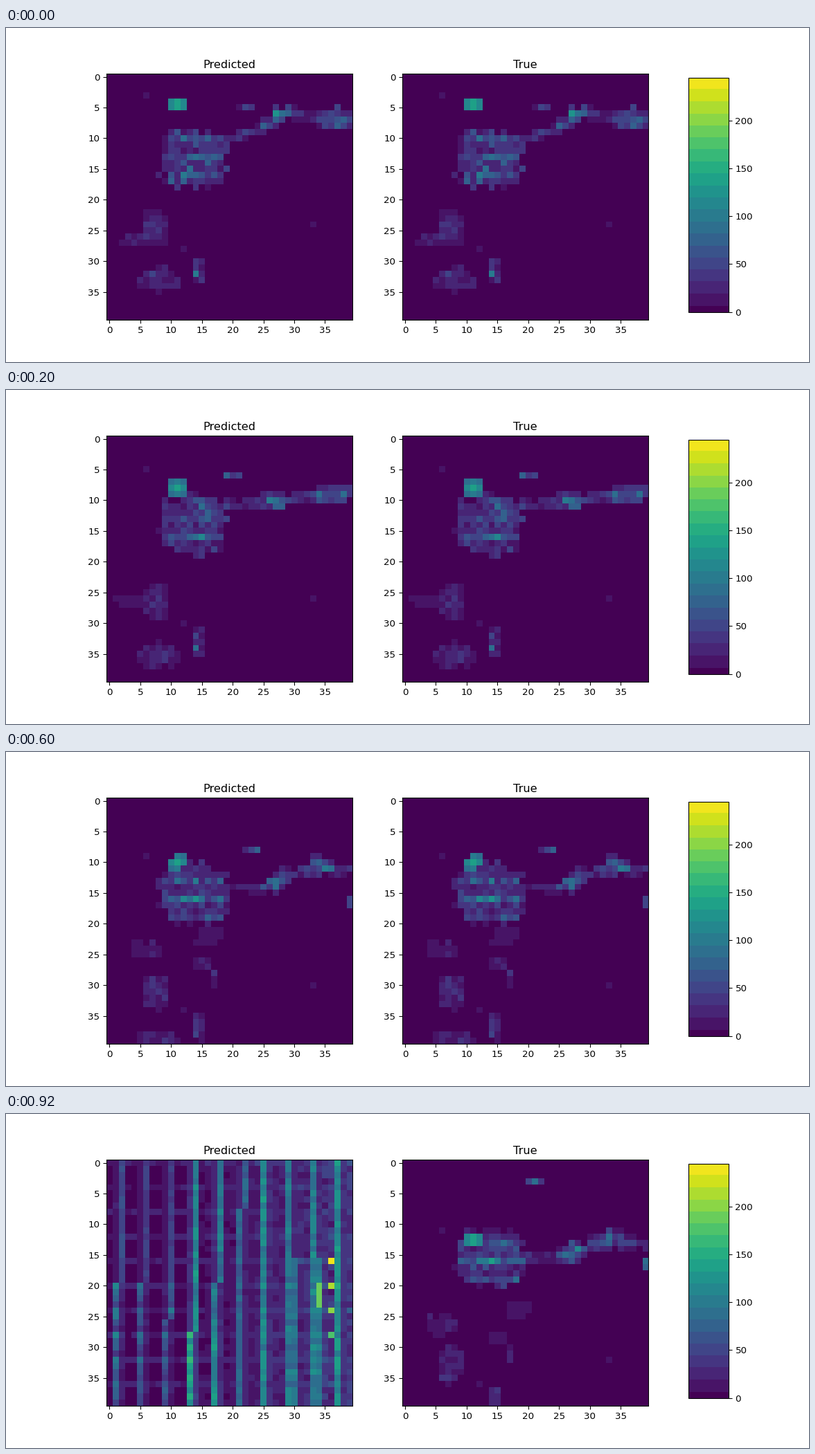
A matplotlib script that plays this animation: 1159 by 483 pixels, repeating every 1 s.

```python
import numpy as np
import matplotlib.pyplot as plt
from matplotlib.animation import FuncAnimation
from matplotlib.colors import ListedColormap

N, FRAMES = 40, 5
VMAX, STEP = 244.5, 12.6
SCALE = 0.966  # text and line size
X, Y = np.meshgrid(np.arange(N), np.arange(N))

# Key positions over time: bright head, upper fragment, and the rain band's
# row at each of its columns.
HEAD_Y = [4.6, 8, 8, 10, 12.6]
UPPER = [(22, 5), (20, 6.2), (19.4, 7.6), (23, 8), (21, 3)]
BAND_X = [19, 24, 29, 33, 39]
BAND_Y = [(10.2, 8.4, 5.8, 6.7, 7.2),
          (11, 10.2, 10, 9.5, 8.7),
          (13, 13, 11.2, 10, 9.8),
          (14, 14.3, 12.4, 10.6, 11.4),
          (15.2, 15.6, 14, 12.2, 13.3)]


def banded_viridis():
    """Viridis in flat steps, the first one half as tall."""
    v = np.linspace(0, VMAX, 490)
    level = np.minimum(np.round(v / STEP), 19) * STEP
    return ListedColormap(plt.get_cmap("viridis")(level / VMAX))


def radar(t):
    """Rain field: drifting clouds with ragged edges and grainy insides."""
    rng = np.random.default_rng(40 + t)
    grain = rng.lognormal(0, 0.35, (N, N))
    edge = rng.uniform(0.6, 1.4, (N, N))
    grid = np.zeros((N, N))

    def blob(x, y, rx, ry, value, texture=grain):
        d = np.abs((X - x) / rx) ** 3 + np.abs((Y - y) / ry) ** 3
        rain = np.where(d < edge, value * (1.15 - 0.5 * d) * texture, 0)
        np.maximum(grid, rain, out=grid)

    # Main cloud with brighter rows, its head and its hot core.
    blob(13.7, 13.3 + 0.6 * t, 5.6, 4.8, 32, grain * (1 + 0.6 * (Y % 3 == 1)))
    blob(11, HEAD_Y[t], 1.4, 1.2, 122, 1)
    blob(14, 16, 1.2, 0.6, 70 + 12 * t, 1)

    # Band to the right edge, with two brighter stretches.
    row = np.interp(X, BAND_X, BAND_Y[t])
    swell = np.exp(-((X - 27) / 2) ** 2) + np.exp(-((X - 37 + t) / 2.5) ** 2)
    width = 0.85 + 0.8 * swell
    off = np.abs(Y - row) / width
    band = (32 - 2 * t) * (1 + 1.3 * swell) * (1.2 - 0.7 * off) * grain
    np.maximum(grid, np.where((X > 18) & (off < edge), band, 0), out=grid)
    blob(*UPPER[t], 1.3, 0.6, 38)

    # Weaker clouds sinking about two rows per step.
    blob(7.5, 24.5 + 2.1 * t, 1.9, 3, 24)
    blob(8, 33 + 2.2 * t, 3.4, 2, 20)
    blob(14.5, 31.5 + 1.75 * t, 0.9, 2.4, 26)
    blob(14, 32 + 2 * t, 0.5, 0.5, 90 - 15 * t, 1)
    if t < 3:
        blob(4 - 0.7 * t, 26.4, 2.5, 1.1, 14)
    if t >= 2:
        blob(6, 17.8 + 2.15 * t, 2.8, 0.5 * t - 0.2, 14)
    if t >= 3:
        blob(9.5 + 2.2 * t, 16 + 2 * t, 2.2, 1.3, 13)
        blob(15, 20 + 2.2 * t, 1.4, 1, 14)
        blob(17, 23 + 2 * t, 0.7, 1.4, 16)
        blob(39, 16.4, 0.9, 1.2, 60)

    for x, y in [(6, 3), (12, 28), (33, 24)]:
        grid[min(y + 2 * t, N - 1), x] += 9
    return grid


def stripes():
    """Bright columns four apart, stronger to the right, in four-row blocks."""
    rng = np.random.default_rng(5)
    grid = 0.028 * X ** 2 * rng.uniform(0.5, 1.4, (N, N))
    grid += 18 * (Y % 4 == 0) * rng.uniform(0.2, 1.5, (N, N))
    peaks = [85, 70, 70, 115, 95, 75, 112, 95, 105, 122]
    turns = [20, 20, 26, 28, 20, 8, 0, 0, 0, 0]  # row of the shift to the left
    rows = np.arange(N)
    for k, (peak, turn) in enumerate(zip(peaks, turns)):
        glow = peak * rng.uniform(0.8, 1.2, N)
        if k < 3:
            glow *= np.where(rows < 20, 0.65, 1.15 - 0.18 * (rows % 4))
        if k in (3, 4):
            glow *= np.where(rows < 28, 1, 1.25)
        main = 4 * k + np.where(rows < turn, 2, 1)
        side = 8 * k + 3 - main
        share = np.where((rows > 15) & (k in (7, 8)), 0.95, 0.3)
        grid[rows, main] = glow
        grid[rows, side] = glow * share
    grid[20:24, 34] = 188
    grid[16:29:4, 36] = np.linspace(244, 172, 4)
    return grid


true = [radar(t) for t in range(FRAMES)]
predicted = true[:-1] + [stripes()]

for key in ("font.size", "axes.linewidth", "axes.titlepad",
            "xtick.major.size", "xtick.major.pad", "xtick.major.width",
            "ytick.major.size", "ytick.major.pad", "ytick.major.width"):
    plt.rcParams[key] *= SCALE

fig, axes = plt.subplots(1, 2, figsize=(11.59, 4.83), dpi=100)
fig.subplots_adjust(right=0.8)
cmap = banded_viridis()
images = []
for ax, title in zip(axes, ("Predicted", "True")):
    images.append(ax.imshow(true[0], cmap=cmap, vmin=0, vmax=VMAX,
                            interpolation="nearest"))
    ax.set_title(title)
fig.colorbar(images[0], cax=fig.add_axes([0.85, 0.15, 0.05, 0.7]))


def update(i):
    images[0].set_data(predicted[i])
    images[1].set_data(true[i])
    return images


anim = FuncAnimation(fig, update, frames=FRAMES, interval=200,
                     repeat=True, repeat_delay=0)
plt.show()
```
